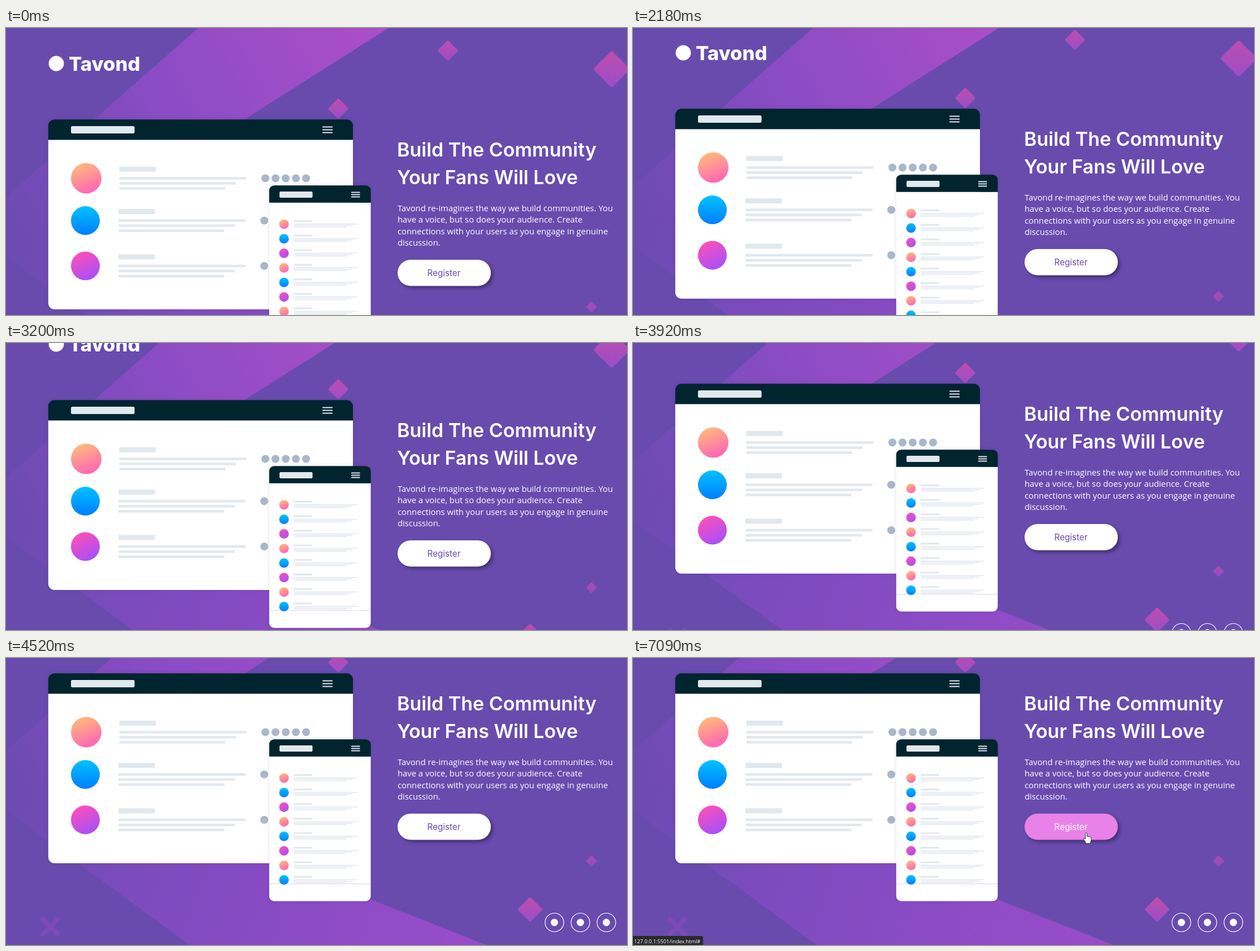
Animation, 1099 px wide and 509 px high, one loop 8000 ms. Source, as an HTML page:

```html
<!DOCTYPE html>
<html lang="en">
<head>
<meta charset="utf-8">
<title>Landing page</title>
<style>
  html, body { margin: 0; width: 100%; height: 100%; overflow: hidden; background: #694bae; }
  svg { display: block; font-family: "Open Sans", sans-serif; }
  text { fill: #fff; }
  .display { font-family: Inter, sans-serif; }
  .panel { filter: drop-shadow(0 0 3px rgba(40, 20, 90, .15)); }
</style>
</head>
<body>
<svg width="1099" height="509" viewBox="0 0 1099 509">
  <defs>
    <linearGradient id="beamTop" gradientUnits="userSpaceOnUse" x1="620" y1="0" x2="10" y2="350">
      <stop stop-color="#a94ec7"/><stop offset=".5" stop-color="#8b4cc5"/><stop offset="1" stop-color="#6d4bb2"/>
    </linearGradient>
    <linearGradient id="beamLow" gradientUnits="userSpaceOnUse" x1="20" y1="360" x2="800" y2="650">
      <stop stop-color="#6d4bb2"/><stop offset=".35" stop-color="#7e4bbf"/><stop offset="1" stop-color="#984cc9"/>
    </linearGradient>
    <linearGradient id="gem" x2="0" y2="1">
      <stop stop-color="#bd4eae"/><stop offset="1" stop-color="#9c4dc8"/>
    </linearGradient>
    <linearGradient id="peach" x1=".3" x2=".7" y2="1">
      <stop stop-color="#ffbb78"/><stop offset="1" stop-color="#ff62b9"/>
    </linearGradient>
    <linearGradient id="blue" x2="0" y2="1">
      <stop stop-color="#00c2ff"/><stop offset="1" stop-color="#007eff"/>
    </linearGradient>
    <linearGradient id="pink" x1=".25" x2=".75" y2="1">
      <stop stop-color="#ff4fb8"/><stop offset="1" stop-color="#a350fb"/>
    </linearGradient>
  </defs>

  <g id="page">
    <path fill="url(#beamTop)" d="M340 0H677L119 355H0V300Z"/>
    <path fill="url(#beamLow)" d="M0 355H119L850 644H325L0 405Z"/>
    <g id="gems" fill="url(#gem)"></g>
    <path d="M65.5 598.5L91.5 624.5M91.5 598.5L65.5 624.5" stroke="#7e4bb6" stroke-width="8" stroke-linecap="round"/>

    <circle cx="89" cy="63" r="13.5" fill="#fff"/>
    <text class="display" x="111" y="76" font-size="34.5" font-weight="800">Tavond</text>

    <g id="desktop" class="panel"></g>
    <g id="phone" class="panel"></g>

    <g class="display" font-size="34" font-weight="600">
      <text x="692" y="228">Build The Community</text>
      <text x="692" y="277">Your Fans Will Love</text>
    </g>
    <g id="copy" font-size="14.8"></g>

    <rect id="button" x="693" y="411" width="165" height="46.5" rx="23.25"
      style="filter: drop-shadow(4px 4px 3px rgba(0, 0, 0, .35))"/>
    <text id="label" class="display" x="775" y="439.5" font-size="15.2" text-anchor="middle">Register</text>
    <g id="social"></g>
  </g>

  <g id="status">
    <path d="M0 493H121Q124 493 124 496V509H0Z" fill="#292a2e"/>
    <text x="2" y="505.5" font-size="9.2">127.0.0.1:5501/index.html#</text>
  </g>
  <g id="cursor" fill="#fff" stroke="#222" stroke-width=".9" stroke-linejoin="round">
    <path id="arrow" d="M0 0V14L3.2 11L5.3 16L7.5 15L5.4 10.3H10Z"/>
    <path id="hand" d="M-1.5 1.2Q0 -1 1.5 1.2V6.5Q3 5.5 4 7Q5.5 6 6.5 7.6Q8.5 7 9 9V13L7 19H0L-4.5 11.5Q-4.5 9.5 -2 10.5L-1.5 11Z"/>
  </g>
</svg>
<script>
const $ = id => document.getElementById(id);
const rect = (x, y, w, h, fill, r = 0) =>
  `<rect x="${x}" y="${y}" width="${w}" height="${h}" rx="${r}" fill="${fill}"/>`;
const disc = (x, y, r, fill) => `<circle cx="${x}" cy="${y}" r="${r}" fill="${fill}"/>`;
const PALE = '#e1e8ee', DARK = '#00252e', GREY = '#a9b7c8';
const PAINTS = ['url(#peach)', 'url(#blue)', 'url(#pink)'];

// White card with a dark header; the body is square where it meets the header.
const frame = (x, y, w, h, head, r) => {
  const cap = (top, side, sweep) =>
    `M${x} ${top}v${side * (r - head)}a${r} ${r} 0 0 ${sweep} ${r} ${-side * r}h${w - 2 * r}` +
    `a${r} ${r} 0 0 ${sweep} ${r} ${side * r}v${side * (head - r)}z`;
  return rect(x, y + head, w, h - 2 * head, '#fff') +
    `<path fill="#fff" d="${cap(y + h - head, -1, 0)}"/>` +
    `<path fill="${DARK}" d="${cap(y + head, 1, 1)}"/>`;
};
const menu = (x, y, w, gap, h) =>
  [-1, 0, 1].map(i => rect(x, y + i * gap - h / 2, w, h, '#e6e2f4', .5)).join('');
const lines = (x, widths, y, gap, h) =>
  widths.map((w, i) => rect(x, y + i * gap, w, h, PALE, h / 4)).join('');

$('gems').innerHTML = [[782, 40, 18.5], [1072, 73, 33], [588, 143, 18.5], [1036, 495, 10], [927.5, 581, 22.5]]
  .map(([x, y, r]) => {
    const a = r * .92, b = r * .08;
    return `<path opacity="${r > 10 ? 1 : .75}" d="M${x - b} ${y - a}Q${x} ${y - r} ${x + b} ${y - a}L${x + a} ${y - b}` +
      `Q${x + r} ${y} ${x + a} ${y + b}L${x + b} ${y + a}Q${x} ${y + r} ${x - b} ${y + a}` +
      `L${x - a} ${y + b}Q${x - r} ${y} ${x - a} ${y - b}Z"/>`;
  }).join('');

$('desktop').innerHTML = frame(74.8, 162.3, 539.2, 336.7, 36, 11) +
  rect(115, 174, 112.5, 13, PALE, 2.5) + menu(560, 180.5, 18, 5, 2) +
  [266.5, 341.5, 422].map((y, i) => {
    const x = i ? 199 : 200.5;
    return disc(i ? 140.5 : 142, y, i ? 25.5 : 27, PAINTS[i]) +
      rect(x, y - 20.5, 64.5, 9, PALE, 1) +
      lines(x, [225, 206, 187.5], y - 2.2, 9, 4.5) +
      [0, 18, 36, 54, 72].slice(0, i ? 1 : 5).map(d => disc((i ? 457 : 459) + d, y, 7, GREY)).join('');
  }).join('');

$('phone').innerHTML = frame(465.8, 279.2, 179.7, 287, 30.5, 9) +
  rect(484, 290, 58.5, 11, PALE, 2) + menu(611, 295.5, 15.5, 4, 1.8) +
  Array.from({ length: 8 }, (_, i) => {
    const y = 348 + i * 25.8;
    return disc(492, y, 8.5, PAINTS[i % 3]) + rect(509, y - 7, 33, 3, PALE, .5) +
      lines(509, [113, 104, 94], y - 1, 2.5, 1.5);
  }).join('');

$('copy').innerHTML = [
  'Tavond re-imagines the way we build communities. You',
  'have a voice, but so does your audience. Create',
  'connections with your users as you engage in genuine',
  'discussion.'
].map((s, i) => `<text x="693" y="${324.5 + i * 20.5}">${s}</text>`).join('');

$('social').innerHTML = [970.5, 1016.5, 1062.5].map(x =>
  `<circle cx="${x}" cy="604" r="16.5" fill="none" stroke="#fff" stroke-width="1.2"/>` +
  disc(x, 604, 6.5, '#fff')).join('');

const ramp = (t, from, to) => Math.min(1, Math.max(0, (t - from) / (to - from)));
const smooth = (t, from, to) => { const u = ramp(t, from, to); return u * u * (3 - 2 * u); };
const blend = (a, b, u) => `rgb(${a.map((v, i) => Math.round(v + (b[i] - v) * u))})`;
const WHITE = [255, 255, 255], PURPLE = [105, 75, 174], ROSE = [232, 130, 232];
const HOVER = 6515;

function pointer(t) {
  if (t < 390) {
    const u = t < 330 ? 0 : 1;
    return [1065 + 21 * u, 413 + 64 * u];
  }
  const a = smooth(t, 5460, 5900), b = smooth(t, 6180, 6640);
  return [1099 - 171 * a - 126 * b, 433 - 53 * a - 70 * b];
}

function draw(t) {
  const scroll = 45 * smooth(t, 1720, 2740) + 44 * smooth(t, 2940, 3575) + 46 * smooth(t, 3870, 4520);
  $('page').setAttribute('transform', `translate(0 ${-Math.round(scroll)})`);

  const lit = smooth(t, HOVER, 6890);
  $('button').setAttribute('fill', blend(WHITE, ROSE, lit));
  $('label').style.fill = blend(PURPLE, WHITE, lit);
  $('status').setAttribute('opacity', ramp(t, 6990, 7090));

  const shown = (t >= 270 && t < 390) || t >= 5520, over = t >= HOVER;
  $('cursor').style.display = shown ? '' : 'none';
  $('cursor').setAttribute('transform', `translate(${pointer(t).map(Math.round)})`);
  $('arrow').style.display = over ? 'none' : '';
  $('hand').style.display = over ? '' : 'none';
}

const start = performance.now();
function tick() {
  draw((performance.now() - start) % 8000);
  requestAnimationFrame(tick);
}
tick();
</script>
</body>
</html>
```
